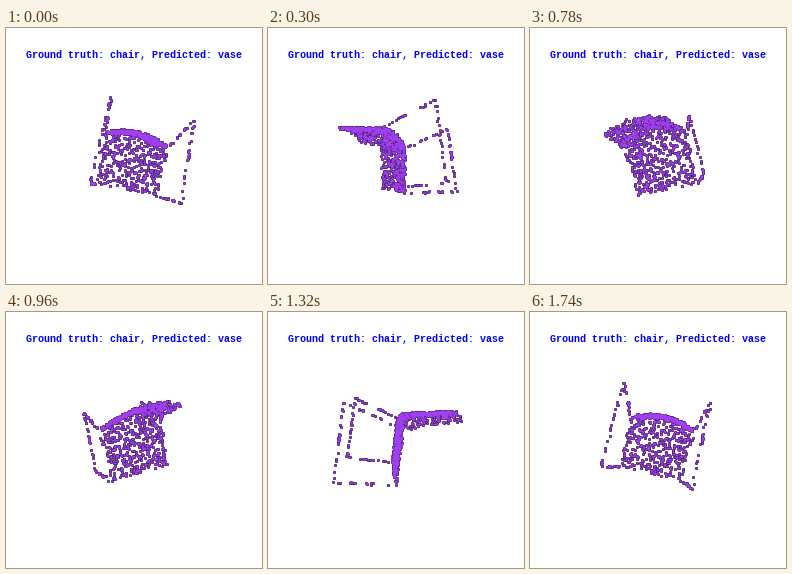
A matplotlib script for the animation above (1.8 s loop, 256x256 px).

```python
import numpy as np
import matplotlib.pyplot as plt
from matplotlib.animation import FuncAnimation

SIZE, DPI = 256, 100
FRAMES, INTERVAL = 30, 60
FOCAL = 222
PX = 72 / DPI
rng = np.random.default_rng(7)

# Chair axes in world space: width, front, and towards the floor
AXES = np.array([[0.962, -0.225, -0.152],
                 [-0.195, -0.958, 0.207],
                 [0.193, 0.169, 0.967]])
HALF, REAR, FRONT, FLOOR = 35.5, -31, 38, 50


def mix(a, b, t):
    return a + (b - a) * t


def seat(n):
    """Seat panel with a bowed rear edge and a slight slope."""
    s, t = rng.uniform(-1, 1, n), rng.random(n)
    width = s * mix(34, 31, t)
    front = mix(-17 - 9 * (1 - s**2), 34, t)
    return np.column_stack([width, front, mix(0, -4, t) + rng.uniform(-1.5, 1.5, n)])


def back(n):
    """Reclined, curved backrest, tapered towards its top."""
    s, t = rng.uniform(-1, 1, n), rng.random(n)
    width = s * mix(34, 25, t)
    bow = mix(9, 5, t) * (1 - s**2)
    front = mix(-17, -33, t) - bow + rng.uniform(-1.5, 1.5, n)
    return np.column_stack([width, front, mix(0, -52, t)])


def tube(p, q, n):
    t = rng.random((n, 1))
    return mix(np.array(p), np.array(q), t) + rng.normal(0, 0.5, (n, 3))


def sled(side):
    """Rear leg, floor runner and front leg on one side."""
    a = side * HALF
    rear, front = (a, REAR, FLOOR), (a, FRONT, FLOOR)
    return np.vstack([tube((side * 34, -18, 0), rear, 17),
                      tube(rear, front, 23),
                      tube(front, (side * 32, 34, -4), 15)])


cloud = np.vstack([seat(480), back(430), sled(-1), sled(1)]) @ AXES


def project(turn):
    x, y, z = cloud.T
    c, s = np.cos(turn), np.sin(turn)
    scale = 1 / (1 - (z * c - x * s) / FOCAL)
    return np.column_stack([SIZE / 2 + (x * c + z * s) * scale,
                            SIZE / 2 - y * scale])


fig = plt.figure(figsize=(SIZE / DPI, SIZE / DPI), dpi=DPI, facecolor="white")
ax = fig.add_axes([0, 0, 1, 1])
ax.set(xlim=(0, SIZE), ylim=(SIZE, 0))
ax.axis("off")
ax.text(20, 30, "Ground truth: chair, Predicted: vase", color="#0000ff",
        family="Liberation Mono", weight="bold", size=10 * PX, va="baseline")


def dots(width, color):
    return ax.scatter([], [], s=(width * PX)**2, c=color, linewidths=0)


layers = [dots(3.1, "#1c0a2c"), dots(2.1, "#a040f0")]


def update(i):
    points = project(2 * np.pi * i / FRAMES)
    for layer in layers:
        layer.set_offsets(points)
    return layers


anim = FuncAnimation(fig, update, frames=FRAMES, interval=INTERVAL,
                     repeat=True, repeat_delay=0)
plt.show()
```
